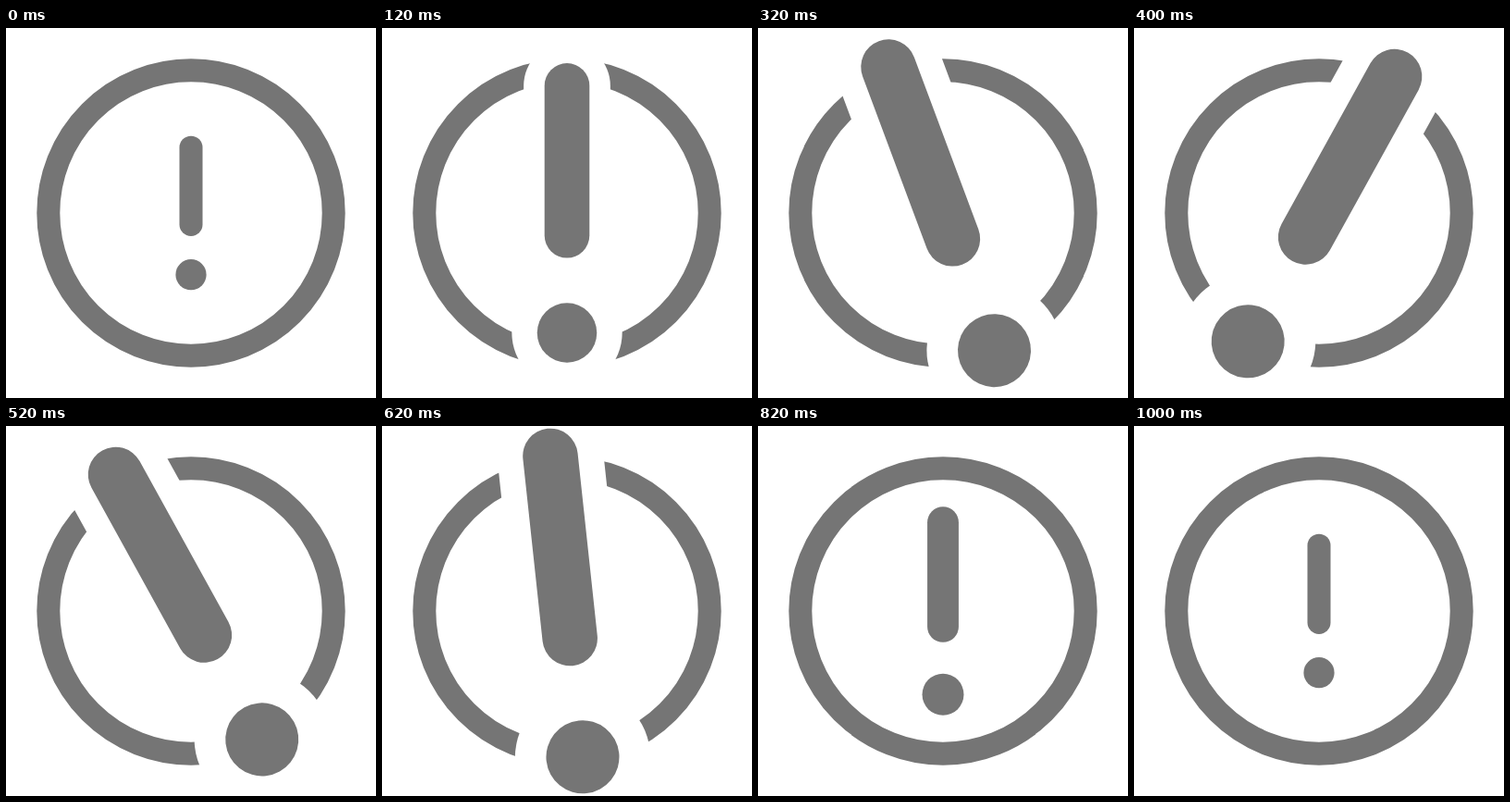
An HTML page that plays this animation: 400x400 px, repeating every 1020 ms.

```html
<!DOCTYPE html>
<html lang="en">
<head>
<meta charset="utf-8">
<title>Alert icon</title>
<style>
  html, body { margin: 0; height: 100%; overflow: hidden; background: #fff; }
  svg { display: block; width: 100%; height: 100%; }
</style>
</head>
<body>
<svg viewBox="-200 -200 400 400">
  <circle r="154.2" fill="none" stroke="#757575" stroke-width="25"/>
  <g id="mark" stroke-linecap="round">
    <!-- white margin that cuts the ring -->
    <path d="M0-70.83V12.5" stroke="#fff" stroke-width="48.2"/>
    <circle cy="66.67" r="30.7" fill="#fff"/>
    <path d="M0-70.83V12.5" stroke="#757575" stroke-width="25"/>
    <circle cy="66.67" r="16.6" fill="#757575"/>
  </g>
</svg>
<script>
  const LOOP = 1020, STEP = 25;
  const mark = document.getElementById('mark');

  // Keys: [time in ms, value, exponent that front-loads the easing]
  const scaleKeys = [[0, 1], [200, 2.38], [650, 2.38], [1000, 1, 0.58]];
  const angleKeys = [[202, 0], [300, -29.1], [403, 29.1], [518, -29.1], [670, 0]];

  const smooth = u => u * u * (3 - 2 * u);

  function valueAt(keys, t) {
    const i = keys.findIndex(key => key[0] > t);
    if (i < 0) return keys[keys.length - 1][1];
    if (i === 0) return keys[0][1];
    const [t0, a] = keys[i - 1], [t1, b, front = 1] = keys[i];
    return a + (b - a) * smooth(((t - t0) / (t1 - t0)) ** front);
  }

  function draw(now) {
    // Poses are 25 ms apart and shown on a 10 ms clock
    const tick = Math.floor((now % LOOP) / 10);
    const t = STEP * (Math.ceil((tick + 1) * 10 / STEP) - 1);
    mark.setAttribute('transform',
      `rotate(${valueAt(angleKeys, t)}) scale(${valueAt(scaleKeys, t)})`);
  }

  const start = performance.now();
  function loop() {
    draw(performance.now() - start);
    requestAnimationFrame(loop);
  }
  loop();
</script>
</body>
</html>
```
